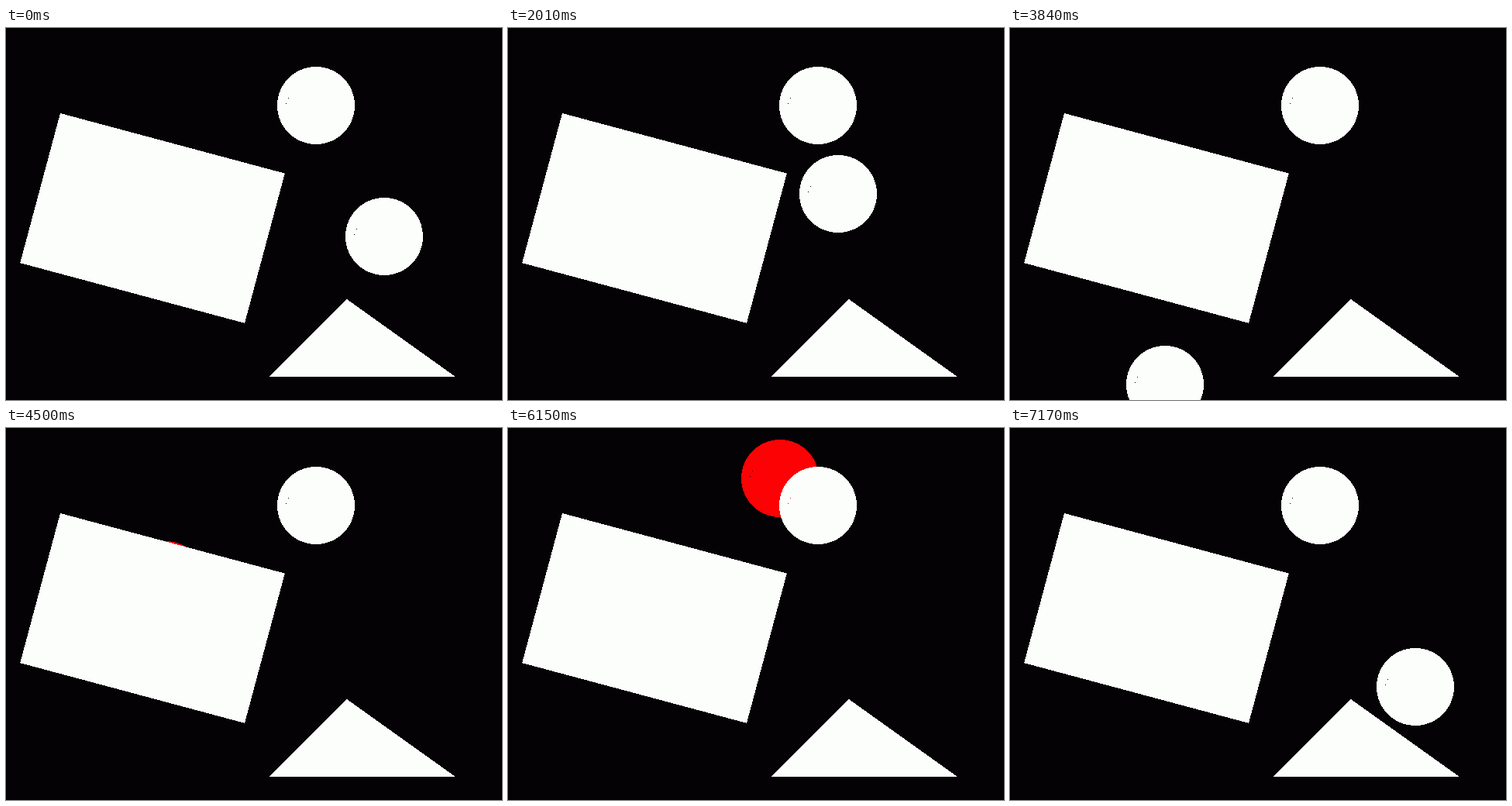
Recreate the animation shown at these times as an HTML page. Size 640 px wide and 480 px high, loop 7.2 s.

```html
<!DOCTYPE html>
<html>
<head>
<meta charset="utf-8">
<style>
html, body { margin: 0; width: 100%; height: 100%; overflow: hidden; background: #040204; }
svg { display: block; width: 100vw; height: 100vh; }
</style>
</head>
<body>
<svg viewBox="0 0 640 480" shape-rendering="crispEdges" fill="#fcfefc">
  <defs>
    <!-- a disc with two pinholes -->
    <path id="disc" fill-rule="evenodd"
      d="M-50 0a50 50 0 1 0 100 0a50 50 0 1 0-100 0zM-36-10h1v1h-1zM-39-3h1v1h-1z"/>
  </defs>
  <use id="ball" href="#disc"/>
  <polygon id="box"/>
  <polygon id="tri"/>
  <use href="#disc" x="400" y="100"/>
</svg>
<script>
const LOOP = 7200, STEP = 30, GLIDE = 750, R = 50;
const WHITE = '#fcfefc', RED = '#fc0204';
const disc = [400, 100];
const tri = [[339.9, 450], [439.9, 350], [580, 450]];

// a 300 by 200 box turned by 15 degrees about its corner
const cos = Math.cos(Math.PI / 12), sin = Math.sin(Math.PI / 12);
const box = [[0, 0], [300, 0], [300, 200], [0, 200]]
  .map(([x, y]) => [70 + x * cos - y * sin, 110 + x * sin + y * cos]);

// each glide eases along one curve, then the ball rests
const home = [488, 269];
const glides = [
  { at: 0, bend: [424, 232], to: [372, 254] },
  { at: 870, bend: [418, 279], to: [405, 154] },
  { at: 1740, bend: [458, 270], to: [417, 385.5] },
  { at: 2880, bend: [326, 372], to: [201, 494] },
  { at: 3660, bend: [195, 346], to: [206, 199] },
  { at: 4410, bend: [210, 147], to: [210, 96] },
  { at: 5220, bend: [225, 54], to: [317, 62] },
  { at: 5970, bend: [470, 65], to: [518, 234] },
  { at: 6720, bend: [535, 308], to: [513, 381] }
];

const $ = id => document.getElementById(id);
const ball = $('ball');
$('box').setAttribute('points', box.join(' '));
$('tri').setAttribute('points', tri.join(' '));

const ease = u => u < 0.5 ? 2 * u * u : 1 - 2 * (1 - u) ** 2;

function place(t) {
  const i = glides.findLastIndex(g => g.at <= t);
  const { at, bend, to } = glides[i];
  const from = i ? glides[i - 1].to : home;
  const s = ease(Math.min(1, (t - at) / GLIDE)), r = 1 - s;
  return [0, 1].map(c => r * r * from[c] + 2 * r * s * bend[c] + s * s * to[c]);
}

function gap([x, y], [ax, ay], [bx, by]) {
  const dx = bx - ax, dy = by - ay;
  const k = ((x - ax) * dx + (y - ay) * dy) / (dx * dx + dy * dy);
  const q = Math.max(0, Math.min(1, k));
  return Math.hypot(x - ax - q * dx, y - ay - q * dy);
}

function touches(p, poly) {
  let inside = true, near = false;
  poly.forEach((a, i) => {
    const b = poly[(i + 1) % poly.length];
    if ((b[0] - a[0]) * (p[1] - a[1]) < (b[1] - a[1]) * (p[0] - a[0])) inside = false;
    if (gap(p, a, b) < R) near = true;
  });
  return inside || near;
}

function draw(t) {
  const p = place(Math.floor(t / STEP) * STEP);
  const hit = touches(p, box) || touches(p, tri) ||
    Math.hypot(p[0] - disc[0], p[1] - disc[1]) < 2 * R;
  ball.setAttribute('x', Math.round(p[0]));
  ball.setAttribute('y', Math.round(p[1]));
  ball.setAttribute('fill', hit ? RED : WHITE);
}

const start = performance.now();
function tick() {
  draw(Math.max(0, performance.now() - start) % LOOP);
  requestAnimationFrame(tick);
}
tick();
</script>
</body>
</html>
```
